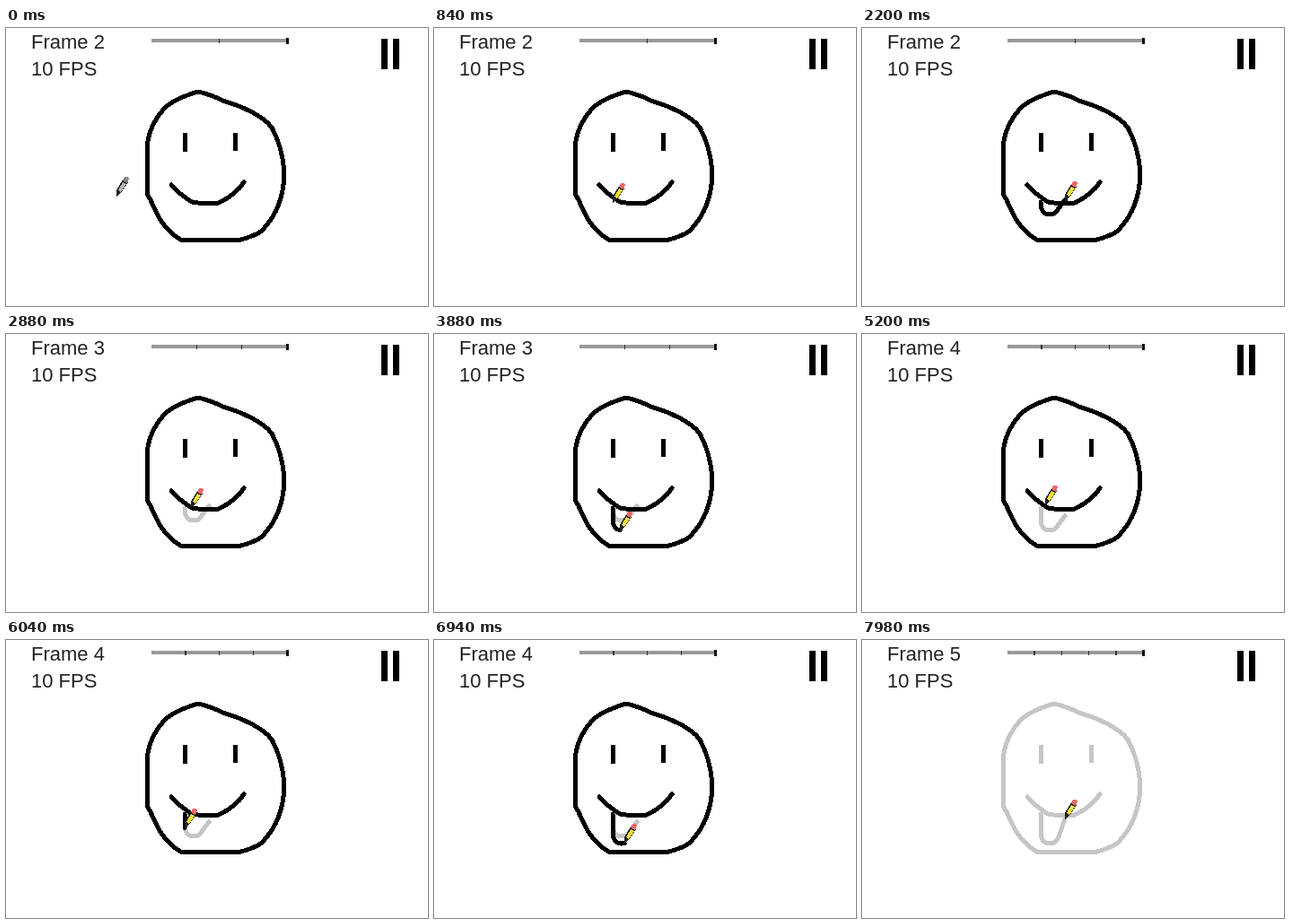
An HTML page that plays this animation: 470 px wide and 310 px high, repeating every 8 s.

```html
<!DOCTYPE html>
<html lang="en">
<head>
<meta charset="utf-8">
<style>
  html, body { margin: 0; width: 100%; height: 100%; overflow: hidden; background: #fff; }
  svg { display: block; }
  text { font: 22px "Liberation Sans", Arial, sans-serif; fill: #222; }
  .ink { fill: none; stroke: #000; stroke-width: 5; stroke-linecap: round; stroke-linejoin: round; }
  .onion { stroke: #c6c6c6; }
  #pencil.grey .body { fill: #b4b4b4; }
  #pencil.grey .eraser { fill: #858585; }
</style>
</head>
<body>
<svg width="470" height="310" viewBox="0 0 470 310">
  <defs>
    <g id="face">
      <path d="M214 71C204 74 185 81 177 89C164 103 157 119 157 138V185C163 193 166 206 174 217Q184 230 195 236.5H260Q277 232 285 226Q310 200 310 160Q307 130 296 111C287 98 262 87 244 82Q228 74 214 71Z"/>
      <path d="M199.5 117V138M255.5 117V137" stroke-linecap="butt"/>
      <path d="M184 175Q193 185 207 194Q222 197 237 195Q257 185 265 172"/>
    </g>
  </defs>
  <text x="28" y="23" id="label"></text>
  <text x="28" y="53">10 FPS</text>
  <g shape-rendering="crispEdges">
    <path d="M162 14H313" stroke="#999" stroke-width="4"/>
    <path id="ticks" stroke="#333" stroke-width="1.5"/>
    <path d="M313.5 11V18" stroke="#111" stroke-width="3"/>
    <path d="M418 12h7v34h-7zM431 12h7v34h-7z"/>
    <g class="ink onion" id="onion"><use href="#face"/><path id="oldTongue"/></g>
    <use class="ink" href="#face" id="freshFace"/>
    <path class="ink" id="tongue" pathLength="1"/>
    <g id="pencil">
      <path d="M0 1V-6L7-18L13-15L5-3Z" fill="#222"/>
      <path class="body" d="M2-6L7-15L11-13L5-4Z" fill="#f2df3c"/>
      <path class="eraser" d="M7-17L9-21H12L14-19L12-14Z" fill="#ee6868"/>
    </g>
  </g>
</svg>
<script>
const LOOP = 8000;
const STEP = 100;
// The step clock restarts at these moments.
const syncs = [0, 840, 1700, 2230, 3380, 4600, 5940, 7980];

// On each page the pencil travels from `from` in an arc, then draws a tongue
// between `down` and `up`.
const pages = [
  { start: 0, paste: 0, from: [123, 187], lift: 7, down: 840, up: 2100, depth: 208, endY: 192 },
  { start: 2230, paste: 2430, from: [226, 192], lift: 0, down: 3050, up: 4480, depth: 219, endY: 203 },
  { start: 4600, paste: 4900, from: [226, 203], lift: 9, down: 5350, up: 7900, depth: 227, endY: 199 },
  { start: 7980, from: [226, 199] }
];
const penStart = [199, 194];

const $ = id => document.getElementById(id);
const tongue = $("tongue");
const mix = (a, b, p) => a + (b - a) * p;

function held(t) {
  const base = syncs.findLast(s => s <= t);
  return base + Math.floor((t - base) / STEP) * STEP;
}

function tonguePath({ depth, endY }) {
  return `M${penStart}V${depth - 12}C199 ${depth + 3} 215 ${depth + 3} 219 ${depth - 7}L226 ${endY}`;
}

function tickPath(count) {
  let d = "";
  for (let i = 1; i < count; i++) d += `M${162 + 151 * i / count} 12V17`;
  return d;
}

function drawPage(page, t) {
  const { start, from, lift, down, up } = page;
  if (!down) {
    tongue.setAttribute("d", "");
    return from;
  }
  if (t <= down) {
    tongue.setAttribute("d", "");
    const p = (t - start) / (down - start);
    return [mix(from[0], penStart[0], p), mix(from[1], penStart[1], p) - lift * 4 * p * (1 - p)];
  }
  const p = Math.min(1, (t - down) / (up - down)) ** 1.2;
  tongue.setAttribute("d", tonguePath(page));
  tongue.setAttribute("stroke-dasharray", `${p} 2`);
  const tip = tongue.getPointAtLength(p * tongue.getTotalLength());
  return [tip.x, tip.y];
}

function render(t) {
  const index = pages.findLastIndex(page => page.start <= t);
  const page = pages[index];
  $("label").textContent = "Frame " + (index + 2);
  $("ticks").setAttribute("d", tickPath(index + 2));
  $("oldTongue").setAttribute("d", index ? tonguePath(pages[index - 1]) : "");
  $("freshFace").style.display = t >= page.paste ? "" : "none";
  const [x, y] = drawPage(page, t).map(Math.round);
  $("pencil").setAttribute("transform", `translate(${x} ${y})`);
  $("pencil").classList.toggle("grey", t < STEP);
}

function tick() {
  render(held(performance.now() % LOOP));
  requestAnimationFrame(tick);
}
tick();
</script>
</body>
</html>
```
